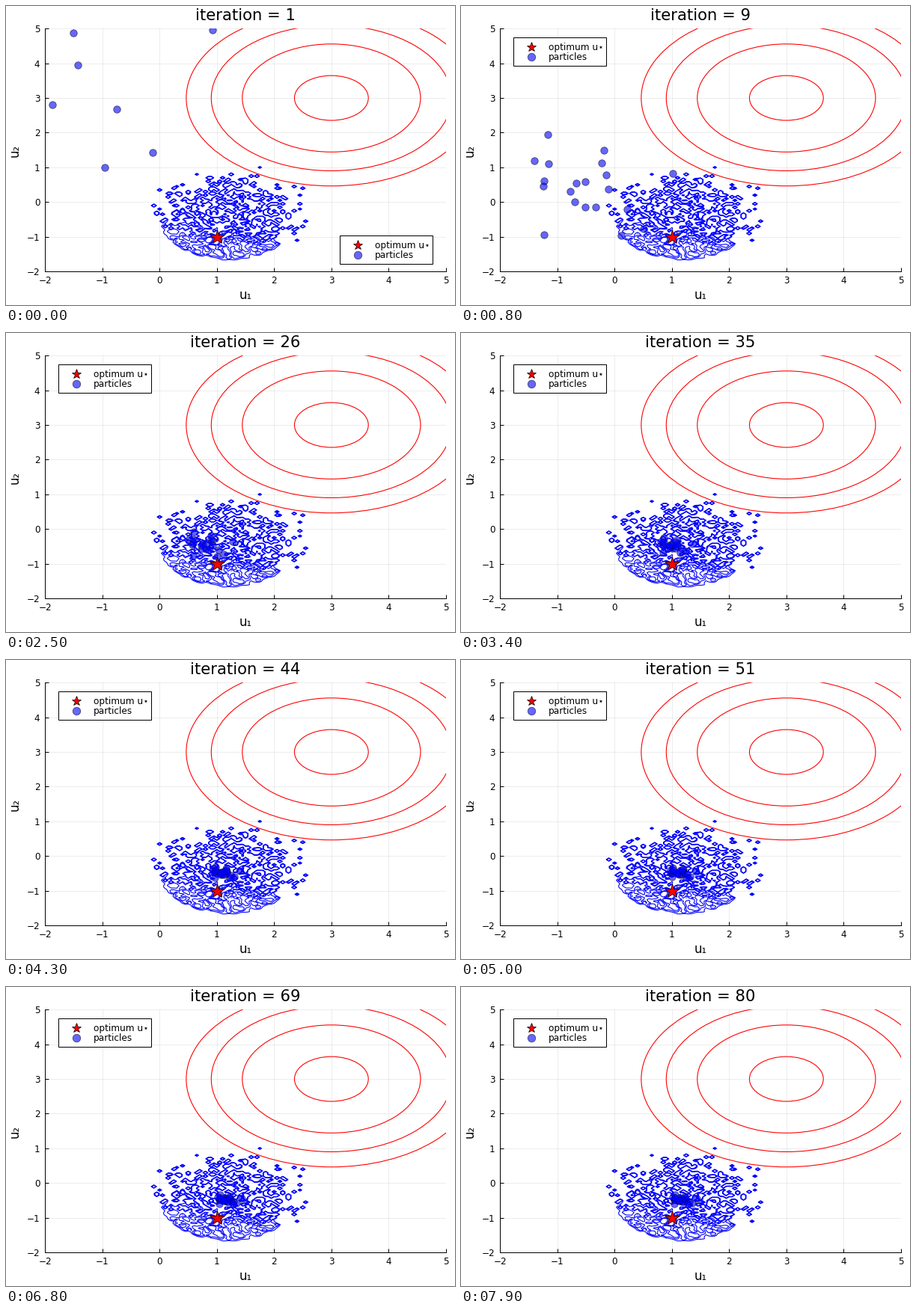
These frames come from a looping animation (600 by 400 pixels, 8000 ms). A matplotlib script:

```python
import numpy as np
import matplotlib.pyplot as plt
from matplotlib.animation import FuncAnimation
from matplotlib.patches import Circle, Rectangle

W, H, DPI = 600, 400, 100
PT = 72 / DPI  # points per pixel
LEFT, RIGHT, TOP, BOTTOM = 52.2, 587.9, 30.2, 355.2
FRAMES, STEP = 80, 100
LEGEND_MOVE = 3

plt.rcParams["font.family"] = "DejaVu Sans"


def smooth(a, kernel, axis):
    k = np.array(kernel) / np.sum(kernel)
    return np.apply_along_axis(np.convolve, axis, a, k, mode="same")


def noisy_field():
    """Rough density: scattered spikes above, ragged plateau below."""
    rng = np.random.default_rng(7)
    xs, ys = np.arange(-0.5, 3.01, 0.05), np.arange(-1.95, 1.41, 0.05)
    x, y = np.meshgrid(xs, ys)
    d = np.hypot(x - 1.2, y + 0.45)

    chance = 0.5 * np.exp(-(d / 1.02) ** 4)
    spikes = (rng.random(x.shape) < chance) * rng.uniform(0.3, 2.2, x.shape)

    n = rng.standard_normal(x.shape)
    n = smooth(smooth(n, [1, 2, 1], 1), [1, 3, 1], 0)
    plateau = (0.32 + 0.16 * n / n.std()) * np.clip((1.24 - d) / 0.1, 0, 1)

    w = 1 / (1 + np.exp(-(y + 0.95 + 0.25 * (x - 1.2)) / 0.14))
    return xs, ys, w * spikes + (1 - w) * plateau


# Each particle keeps its offset from the mean while the cloud contracts
shape = np.random.default_rng(4).standard_normal((20, 2))
shape = (shape - shape.mean(0)) / shape.std(0)
shape[:2] = (2.6, 0.5), (-1.3, -2.0)


def particles(i):
    mean = np.array([1.18 - 3.38 * 0.915 ** i, -0.47 + 4.65 * 0.82 ** i])
    spread = np.array([0.1, 0.06]) + np.array([1.1, 1.5]) * 0.9 ** i
    return mean + spread * shape


fig = plt.figure(figsize=(W / DPI, H / DPI), dpi=DPI, facecolor="white")

# Plot area in data units
ax = fig.add_axes([LEFT / W, 1 - BOTTOM / H, (RIGHT - LEFT) / W, (BOTTOM - TOP) / H])
ax.set(xlim=(-2, 5), ylim=(-2, 5), xticks=range(-2, 6), yticks=range(-2, 6))
ax.set_axisbelow(True)
ax.grid(color="black", alpha=0.1, lw=0.5)
ax.spines[["top", "right"]].set_visible(False)
ax.spines[["left", "bottom"]].set_linewidth(PT)
ax.tick_params(direction="in", length=5 * PT, width=PT, labelsize=12 * PT)
ax.tick_params(axis="x", pad=5.5 * PT)
ax.tick_params(axis="y", pad=6.8 * PT)

for radius in (0.645, 1.556, 2.098, 2.535):
    ax.add_patch(Circle((3, 3), radius, fill=False, ec="red", lw=1.1 * PT))
ax.contour(*noisy_field(), levels=[0.15, 0.3, 0.45], colors="blue",
           linewidths=1.1 * PT)

STAR = dict(marker="*", color="red", mec="black", ls="")
DOT = dict(marker="o", color=(0, 0, 1, 0.6), mec=(0, 0, 0, 0.6), ls="")
ax.plot([1], [-1], ms=20 * PT, mew=0.8 * PT, zorder=4, **STAR)
cloud, = ax.plot([], [], ms=9.5 * PT, mew=0.8 * PT, zorder=1.8, **DOT)

# Overlay in pixel units
px = fig.add_axes([0, 0, 1, 1], zorder=3)
px.set(xlim=(0, W), ylim=(H, 0))
px.axis("off")


def label(x, y, s, size, **kw):
    return px.text(x, y, s, fontsize=size * PT, va="baseline", **kw)


title = label(320, 18.7, "", 21.1, ha="center")
label(320, 392.3, "u₁", 16.5, ha="center")
label(16.5, 193, "u₂", 16.5, ha="center", rotation=90, rotation_mode="anchor")

box = Rectangle((0, 0), 123.4, 38.5, fc="white", ec="black", lw=PT)
px.add_patch(box)
star, = px.plot([], [], ms=13.5 * PT, mew=0.7 * PT, **STAR)
dot, = px.plot([], [], ms=10.5 * PT, mew=0.8 * PT, **DOT)
names = [label(0, 0, s, 12.1) for s in ("optimum u⋆", "particles")]


def place_legend(x, y):
    box.set_xy((x, y))
    star.set_data([x + 23.5], [y + 13])
    dot.set_data([x + 23.5], [y + 26])
    for k, text in enumerate(names):
        text.set_position((x + 46.5, y + 17.5 + 13 * k))


def draw(i):
    title.set_text(f"iteration = {i + 1}")
    cloud.set_data(*particles(i).T)
    place_legend(*((446.4, 306.5) if i < LEGEND_MOVE else (70.4, 41.5)))
    return title, cloud, box, star, dot, *names


anim = FuncAnimation(fig, draw, frames=FRAMES, interval=STEP, repeat=True,
                     repeat_delay=0)
plt.show()
```
